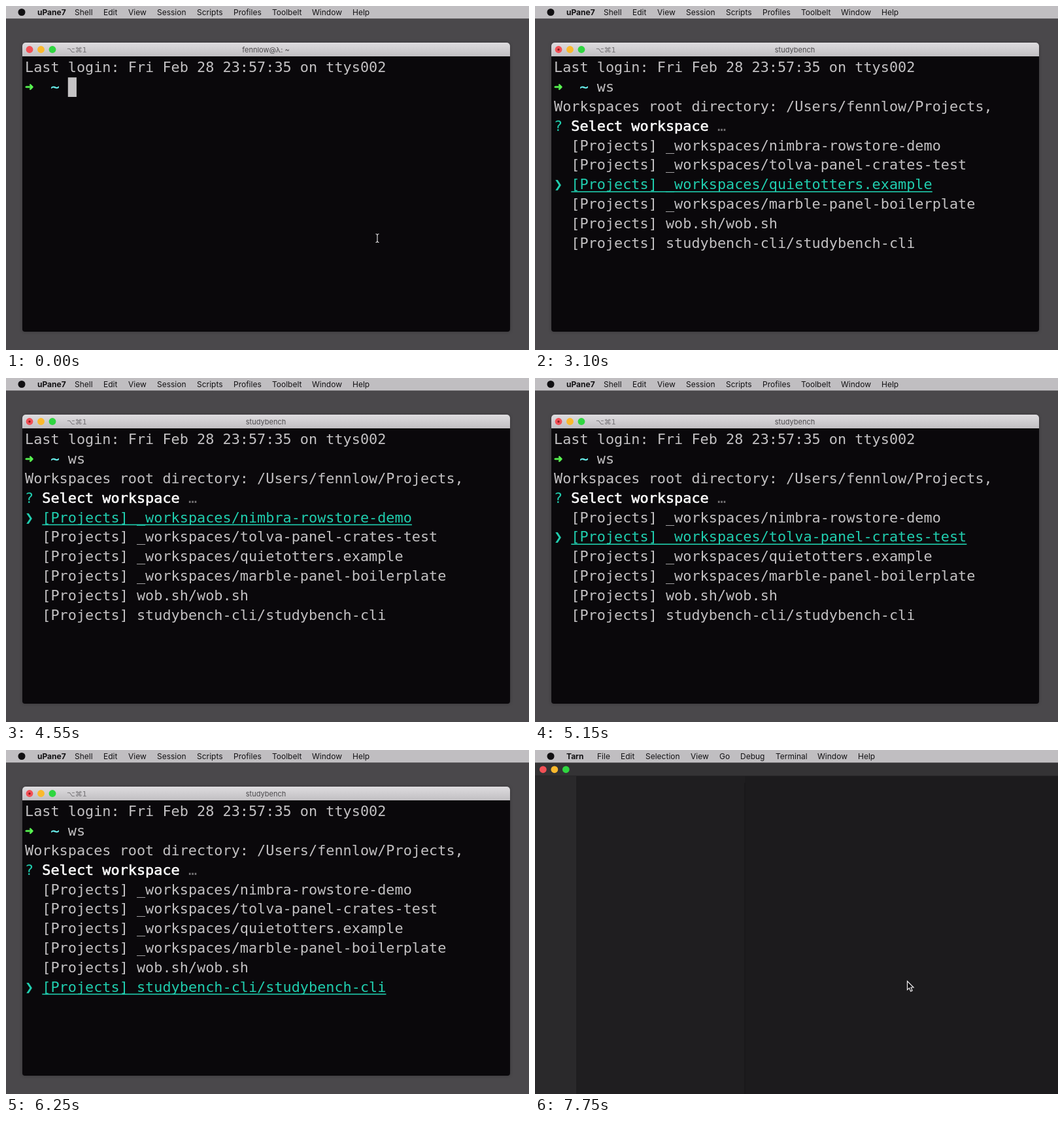
Recreate the animation shown at these times as an HTML page with a canvas. Size 800 by 526 pixels, loop 8 s.

```html
<!DOCTYPE html>
<html lang="en">
<head>
<meta charset="utf-8">
<title>Terminal workspace picker</title>
<style>
  html, body { margin: 0; width: 100%; height: 100%; overflow: hidden; background: #4a484b; }
  canvas { display: block; }
</style>
</head>
<body>
<canvas id="stage" width="800" height="526"></canvas>
<script>
const ctx = document.getElementById('stage').getContext('2d');
const LOOP = 8000;
const CELL = 13.154, LINE = 29.8, LEFT = 29, TOP = 79.4;
const MONO = '21.85px "DejaVu Sans Mono", monospace';
const UI = 'Inter, sans-serif';

const C = {
  text: '#c3c1c3', bright: '#ffffff', dim: '#737173', teal: '#20ceaf',
  green: '#5af953', check: '#2bdc3c', cyan: '#6af0ee', blue: '#6264d9',
  red: '#e2585e', yellow: '#e9d95b', black: '#0a080b', bar: '#c0bec1'
};

const USER = 'fennlow';
const TOOL = 'studybench-cli';
const ITEMS = [
  '_workspaces/nimbra-rowstore-demo',
  '_workspaces/tolva-panel-crates-test',
  '_workspaces/quietotters.example',
  '_workspaces/marble-panel-boilerplate',
  'wob.sh/wob.sh',
  TOOL + '/' + TOOL
].map(path => '[Projects] ' + path);

const TERMINAL_MENU = [['uPane7', 48], ['Shell', 105], ['Edit', 149], ['View', 187],
  ['Session', 231], ['Scripts', 292], ['Profiles', 348], ['Toolbelt', 407],
  ['Window', 468], ['Help', 530]];
const EDITOR_MENU = [['Tarn', 48], ['File', 95], ['Edit', 131], ['Selection', 169],
  ['View', 238], ['Go', 282], ['Debug', 314], ['Terminal', 368], ['Window', 432], ['Help', 494]];

// Times in ms
const TYPE_W = 950, TYPE_S = 1200, RUN = 2000, LIST = 2200;
const CHOOSE = 6750, SHELL = 7050, BLUR = 7300, SWITCH = 7400, EDITOR = 7450, PANELS = 7600;
const DOWN = [2900, 3050, 3250, 3400, 3550, 5150, 5350, 5550, 5750, 5900];
const UP = [3750, 3900, 4100, 4300, 4500];

const countPast = (times, t) => times.filter(at => t >= at).length;
const selectedAt = t => countPast(DOWN, t) - countPast(UP, t);

function rect(x, y, w, h, fill) {
  ctx.fillStyle = fill;
  ctx.fillRect(x, y, w, h);
}

function dot(x, y, r, fill) {
  ctx.fillStyle = fill;
  ctx.beginPath();
  ctx.arc(x, y, r, 0, Math.PI * 2);
  ctx.fill();
}

function label(text, x, y, font, fill, align = 'left') {
  ctx.font = font;
  ctx.textAlign = align;
  ctx.fillStyle = fill;
  ctx.fillText(text, x, y);
}

function vertical(y0, y1, from, to) {
  const g = ctx.createLinearGradient(0, y0, 0, y1);
  g.addColorStop(0, from);
  g.addColorStop(1, to);
  return g;
}

// Writes text on the terminal grid
function put(row, col, text, color = C.text, strong = false) {
  const x = LEFT + col * CELL, y = TOP + row * LINE + 22;
  label(text, x, y, MONO, color);
  if (strong) {
    ctx.strokeStyle = color;
    ctx.lineWidth = 0.6;
    ctx.strokeText(text, x, y);
  }
}

function block(row, col) {
  rect(LEFT + col * CELL, TOP + row * LINE, CELL, LINE, '#c5c3c5');
}

function trafficLights(x, y) {
  ['#f25056', '#fab92d', '#2fd640'].forEach((color, i) => dot(x + i * 17.5, y, 5.4, color));
}

function menuBar(items) {
  rect(0, 0, 800, 19, C.bar);
  rect(0, 19, 800, 1, '#5d5b5e');
  dot(24, 9.5, 5.5, '#111012');
  items.forEach(([text, x], i) =>
    label(text, x, 14, (i ? '' : 'bold ') + '12px ' + UI, '#131214'));
}

function titleAt(t) {
  if (t < RUN) return USER + '@λ: ~';
  if (t < SHELL) return 'studybench';
  return USER + '@λ: ~/Projects/' + TOOL;
}

function terminalFrame(t) {
  const active = t < BLUR;
  ctx.save();
  ctx.beginPath();
  ctx.roundRect(25, 56, 746, 442, [5, 5, 4, 4]);
  ctx.shadowColor = 'rgba(0,0,0,.25)';
  ctx.shadowBlur = 5;
  ctx.fillStyle = C.black;
  ctx.fill();
  ctx.shadowColor = 'transparent';
  ctx.clip();
  rect(25, 56, 746, 21, active ? vertical(56, 77, '#dedcdf', '#c1bfc2') : vertical(56, 77, '#d2d0d3', '#c6c4c7'));
  ctx.restore();
  if (active) trafficLights(36, 66.5);
  if (t >= RUN) dot(36, 66.7, 1.6, active ? '#83171c' : '#4b494c');
  label('⌥⌘1', 93, 71, '11px "DejaVu Sans", sans-serif', active ? '#747275' : '#a5a3a6');
  label(titleAt(t), 397.5, 70.5, '11px ' + UI, active ? '#4b494c' : '#969497', 'center');
}

function picker(t) {
  const selected = selectedAt(t);
  put(3, 0, '?', C.teal);
  put(3, 2, 'Select workspace', C.bright, true);
  put(3, 19, '…', C.dim);
  ITEMS.forEach((item, i) => {
    const on = i === selected, row = i + 4;
    put(row, 2, item, on ? C.teal : C.text);
    if (!on) return;
    put(row, 0, '❯', C.teal);
    rect(LEFT + 2 * CELL, TOP + row * LINE + 25, item.length * CELL, 1.6, C.teal);
  });
}

function result(t) {
  const choice = ITEMS[5], room = 56 - 21;
  put(3, 0, '✔', C.check);
  put(3, 2, 'Select workspace', C.bright, true);
  put(3, 19, '·', C.dim);
  put(3, 21, choice.slice(0, room), C.teal);
  put(4, 0, choice.slice(room), C.teal);
  put(5, 0, 'Entering workspace directory in a subshell');
  put(6, 0, '/Users/' + USER + '/Projects/' + TOOL);
  put(7, 0, "Enter 'exit' to exit subshell");
  if (t < SHELL) return block(8, 0);
  put(8, 0, '➜', C.green, true);
  put(8, 3, TOOL, C.cyan, true);
  put(8, 18, 'git:(', C.blue, true);
  put(8, 23, 'master', C.red, true);
  put(8, 29, ')', C.blue, true);
  put(8, 31, '✗', C.yellow, true);
  if (t < BLUR) block(8, 33);
}

function terminalText(t) {
  const typed = t < TYPE_W ? '' : t < TYPE_S ? 'w' : 'ws';
  put(0, 0, 'Last login: Fri Feb 28 23:57:35 on ttys002');
  put(1, 0, '➜', C.green, true);
  put(1, 3, '~', C.cyan, true);
  put(1, 5, typed);
  if (t < RUN) return block(1, 5 + typed.length);
  if (t < LIST) return block(2, 0);
  put(2, 0, 'Workspaces root directory: /Users/' + USER + '/Projects,');
  if (t < CHOOSE) picker(t);
  else result(t);
}

function editor(t) {
  rect(0, 20, 800, 506, '#1c1b1d');
  rect(0, 20, 800, 20, '#343335');
  rect(0, 39, 800, 1, '#272628');
  trafficLights(12.3, 29.8);
  if (t < PANELS) return;
  rect(0, 40, 63, 486, '#2a292b');
  rect(63, 40, 258, 486, '#1f1e20');
  rect(320, 50, 2, 476, '#19181a');
}

function textPointer() {
  ctx.strokeStyle = '#d4d2d4';
  ctx.lineWidth = 1.2;
  ctx.beginPath();
  ctx.moveTo(565.5, 348.5);
  ctx.quadraticCurveTo(568, 348.5, 568, 351);
  ctx.quadraticCurveTo(568, 348.5, 570.5, 348.5);
  ctx.moveTo(568, 350);
  ctx.lineTo(568, 359.5);
  ctx.moveTo(565.5, 361.5);
  ctx.quadraticCurveTo(568, 361.5, 568, 359);
  ctx.quadraticCurveTo(568, 361.5, 570.5, 361.5);
  ctx.stroke();
}

function arrowPointer() {
  const path = new Path2D('M569.5 353.5v13.2l3-2.8 2.2 5 2.4-1-2.1-4.9h4z');
  ctx.fillStyle = '#0b0a0c';
  ctx.fill(path);
  ctx.strokeStyle = '#eeecee';
  ctx.lineWidth = 1.2;
  ctx.stroke(path);
}

function draw(t) {
  rect(0, 0, 800, 526, '#4a484b');
  menuBar(t < SWITCH ? TERMINAL_MENU : EDITOR_MENU);
  if (t < EDITOR) {
    terminalFrame(t);
    terminalText(t);
  } else {
    editor(t);
  }
  if (t < TYPE_W) textPointer();
  if (t >= BLUR) arrowPointer();
}

const start = performance.now();
function tick() {
  draw((performance.now() - start) % LOOP);
  requestAnimationFrame(tick);
}
tick();
</script>
</body>
</html>
```
